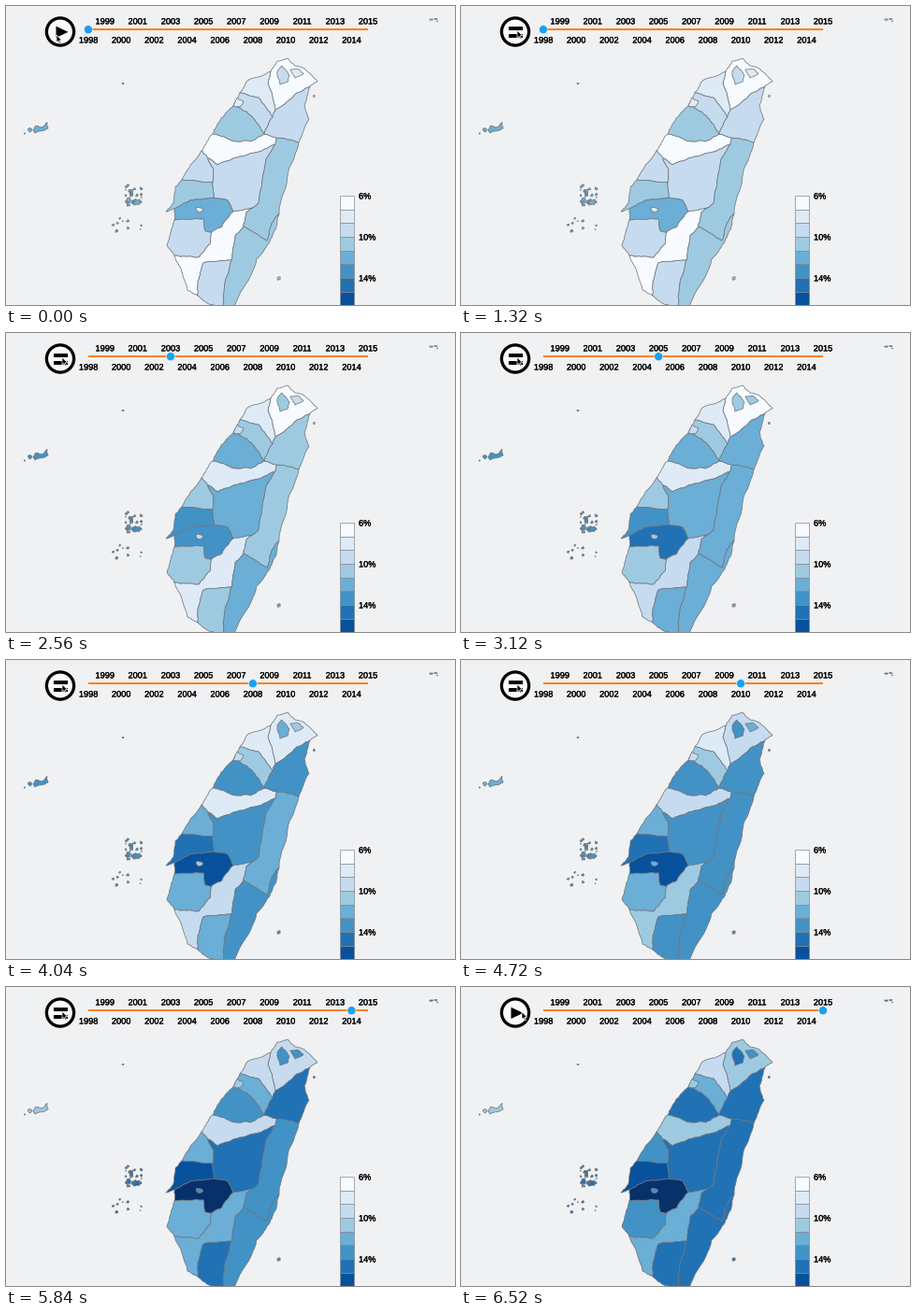
Write a matplotlib script that moves like this. It is 480 by 320 pixels and loops after 6560 ms.

```python
import numpy as np
import matplotlib.pyplot as plt
from matplotlib.animation import FuncAnimation
from matplotlib.patches import Circle, Polygon, Rectangle
from matplotlib.patheffects import withStroke

W, H, DPI = 480, 320, 100
STEP, LOOP = 40, 6560
PX = 72 / DPI
CLICK, FIRST_TICK, TICK, STOP = 1040, 1335, 292, 6270
START, END = 1998, 2015

BG, EDGE = "#f0f1f3", "#6f757b"
BLUES = ["#f7fbff", "#deebf7", "#c6dbef", "#9ecae1", "#6baed6",
         "#4292c6", "#2171b5", "#08519c", "#08306b"]

plt.rcParams["font.family"] = "Liberation Sans"
rng = np.random.default_rng(7)

fig = plt.figure(figsize=(W / DPI, H / DPI), dpi=DPI, facecolor=BG)
ax = fig.add_axes([0, 0, 1, 1])
ax.set(xlim=(0, W), ylim=(H, 0))
ax.axis("off")


def put(patch):
    return ax.add_patch(patch)


def label(x, y, s, ha="center"):
    ax.text(x, y, s, size=9.2 * PX, ha=ha, va="baseline", color="black",
            path_effects=[withStroke(linewidth=0.3 * PX, foreground="black")])


def arc(*xy):
    """Line through a few key points, roughened by midpoint displacement."""
    pts = np.array(xy, float).reshape(-1, 2)
    for _ in range(3):
        d = np.diff(pts, axis=0)
        length = np.hypot(*d.T)[:, None]
        normal = np.column_stack([-d[:, 1], d[:, 0]]) / length
        out = np.empty((2 * len(pts) - 1, 2))
        out[::2] = pts
        out[1::2] = pts[:-1] + d / 2 + normal * np.sqrt(length) * rng.uniform(
            -0.22, 0.22, length.shape)
        pts = out
    return pts


def ring(first, *rest):
    """Join arcs that share end points into one closed outline."""
    joined = any(np.allclose(first[-1], rest[0][k]) for k in (0, -1))
    path = first if joined else first[::-1]
    for a in rest:
        path = np.vstack([path, a if np.allclose(path[-1], a[0]) else a[::-1]])
    return path


def blob(x, y, rx, ry=None, n=9):
    a = np.linspace(0, 2 * np.pi, n, endpoint=False)
    r = rng.uniform(0.6, 1.2, n)
    return np.column_stack([x + rx * r * np.cos(a), y + (ry or rx) * r * np.sin(a)])


def scatter(n, x0, x1, y0, y1, size):
    return [blob(rng.uniform(x0, x1), rng.uniform(y0, y1), rng.uniform(0.4, size))
            for _ in range(n)]


# Coast, clockwise from the north-west
c_newtaipei = arc(283, 70, 290, 59, 301, 56, 309, 64, 319, 67, 333, 81, 325, 86)
c_yilan = arc(325, 86, 319, 106, 324, 121, 313, 146)
c_hualien = arc(313, 146, 302, 176, 292, 222)
c_taitung = arc(292, 222, 289, 237, 281, 254, 268, 271, 264, 283, 244, 324)
c_south = arc(244, 324, 232, 324)
c_pingtung = arc(232, 324, 217, 319, 205, 310)
c_kaohsiung = arc(205, 310, 194, 304, 180, 267)
c_tainan = arc(180, 267, 172, 256, 180, 229)
c_chiayi = arc(180, 229, 180, 217)
c_yunlin = arc(180, 217, 171, 220, 179, 211, 181, 194, 188, 186)
c_changhua = arc(188, 186, 209, 155)
c_taichung = arc(209, 155, 221, 137)
c_miaoli = arc(221, 137, 230, 120, 243, 107)
c_hsinchu = arc(243, 107, 250, 93)
c_taoyuan = arc(250, 93, 258, 80, 283, 70)

# Inland borders
newtaipei_taoyuan = arc(283, 70, 280, 83, 288, 111)
newtaipei_yilan = arc(325, 86, 311, 93, 288, 111)
taoyuan_yilan = arc(288, 111, 285, 119)
taoyuan_hsinchu = arc(250, 93, 270, 98, 285, 119)
hsinchu_yilan = arc(285, 119, 276, 137)
hsinchu_miaoli = arc(276, 137, 270, 127, 257, 113, 243, 107)
miaoli_taichung = arc(276, 137, 262, 145, 245, 145, 221, 137)
taichung_yilan = arc(276, 137, 289, 141)
yilan_hualien = arc(289, 141, 313, 146)
taichung_hualien = arc(289, 141, 288, 148)
taichung_nantou = arc(288, 148, 275, 154, 250, 161, 226, 170, 216, 163)
taichung_changhua = arc(216, 163, 209, 155)
changhua_nantou = arc(216, 163, 222, 176, 221, 189)
changhua_yunlin = arc(188, 186, 221, 189)
yunlin_nantou = arc(221, 189, 222, 205)
yunlin_chiayi = arc(180, 217, 197, 208, 222, 205)
chiayi_nantou = arc(222, 205, 237, 208, 243, 220)
nantou_hualien = arc(288, 148, 278, 164, 270, 211, 264, 216)
nantou_kaohsiung = arc(243, 220, 264, 216)
hualien_kaohsiung = arc(264, 216, 257, 221, 254, 236)
hualien_taitung = arc(254, 236, 279, 251, 284, 232, 292, 222)
kaohsiung_taitung = arc(254, 236, 245, 246, 241, 272)
chiayi_tainan = arc(180, 229, 211, 228, 213, 241, 220, 242)
chiayi_kaohsiung = arc(220, 242, 231, 236, 243, 220)
tainan_kaohsiung = arc(220, 242, 218, 255, 206, 269, 180, 267)
kaohsiung_pingtung = arc(241, 272, 211, 275, 205, 295, 205, 310)
pingtung_taitung = arc(241, 272, 234, 297, 232, 324)

counties = []


def county(start, end, *outlines, bump=0):
    """Add a county whose colour band moves from start to end."""
    group = [put(Polygon(o, ec=EDGE, lw=0.75 * PX, joinstyle="round"))
             for o in outlines]
    counties.append((group, start, end, bump))


county(-0.8, 3.05, ring(c_newtaipei, newtaipei_yilan, newtaipei_taoyuan))
county(1, 2.1, ring(c_taoyuan, newtaipei_taoyuan, taoyuan_yilan, taoyuan_hsinchu))
county(2.7, 4.1, ring(c_hsinchu, taoyuan_hsinchu, hsinchu_yilan, hsinchu_miaoli))
county(3.5, 6.1, ring(c_miaoli, hsinchu_miaoli, miaoli_taichung))
county(0.2, 3.05, ring(c_taichung, miaoli_taichung, taichung_yilan, taichung_hualien,
                       taichung_nantou, taichung_changhua))
county(2.5, 5.1, ring(c_changhua, taichung_changhua, changhua_nantou, changhua_yunlin))
county(2.95, 6.3, ring(taichung_nantou, changhua_nantou, yunlin_nantou, chiayi_nantou,
                       nantou_kaohsiung, nantou_hualien))
county(3.9, 7.9, ring(c_yunlin, changhua_yunlin, yunlin_nantou, yunlin_chiayi))
county(4.8, 8.38, ring(c_chiayi, yunlin_chiayi, chiayi_nantou, chiayi_kaohsiung,
                       chiayi_tainan))
county(2.5, 5.1, ring(c_tainan, chiayi_tainan, tainan_kaohsiung))
county(0.4, 4.4, ring(c_kaohsiung, tainan_kaohsiung, chiayi_kaohsiung,
                      nantou_kaohsiung, hualien_kaohsiung, kaohsiung_taitung,
                      kaohsiung_pingtung))
county(2.4, 6.4, ring(c_pingtung, kaohsiung_pingtung, pingtung_taitung))
county(3.5, 6.1, ring(c_taitung, c_south, pingtung_taitung, kaohsiung_taitung,
                      hualien_taitung), blob(291.5, 291.5, 2))
county(3, 6, ring(c_hualien, hualien_taitung, hualien_kaohsiung, nantou_hualien,
                  taichung_hualien, yilan_hualien))
county(2.75, 6.4, ring(c_yilan, yilan_hualien, taichung_yilan, hsinchu_yilan,
                       taoyuan_yilan, newtaipei_yilan),
       blob(329.5, 96.5, 1.2), blob(454.5, 14.5, 1.8, 0.8),
       blob(459.5, 14, 1.6, 0.8), blob(461, 16.5, 0.5))

# Cities: Taipei, Keelung, Hsinchu, Chiayi
county(2.1, 6.1, arc(295, 64, 303, 74, 301, 81, 293, 84, 290, 70, 295, 64))
county(1.4, 5.4, arc(304, 68, 312, 67, 318, 72, 309, 77, 304, 68))
county(1.7, 3.1, arc(243, 107, 247, 98, 254, 102, 250, 108, 243, 107))
county(1.4, 5.4, blob(206.5, 218, 4.8, 3))

# Kinmen and Penghu
county(4.2, 3.5, arc(29, 133, 32, 128, 38, 130, 44, 124.5, 45, 131, 31, 136, 29, 133),
       blob(25.5, 132.5, 2.2), blob(20, 136.5, 0.7), blob(125, 83, 1.2, 0.7), bump=1.4)
county(4.7, 6.1, blob(139, 210, 5.5, 3.5, 15), blob(131, 208, 3, 3, 13),
       blob(134, 200, 2.8, 4.5, 13), *scatter(22, 127, 145, 191, 214, 1.5),
       *scatter(8, 113, 131, 225, 243, 1.4), *scatter(2, 141, 145, 234, 241, 1.1))

# Legend
for i, c in enumerate(BLUES):
    put(Rectangle((357, 203 + 14.67 * i), 14.5, 14.67, fc=c, ec="#858a90",
                  lw=0.7 * PX))
for i in range(3):
    label(377, 206.5 + 44 * i, f"{6 + 4 * i}%", "left")


# Time slider
def year_x(year):
    return 88 + (year - START) * 17.59


put(Rectangle((88, 23.6), 299, 2.8, fc="#ff7f0e", lw=0))
for year in range(START, END + 1):
    label(year_x(year), 19.4 if year % 2 else 39.5, str(year))
handle = put(Circle((88, 25.2), 4.6, fc="#1ba1f0", ec=BG, lw=0.7 * PX))

# Play / pause button and pointer
put(Circle((58, 27.5), 14.6, fc="#fafafb", ec="black", lw=3.3 * PX))
play = put(Polygon([(53.5, 21.7), (53.5, 34), (66.5, 27.8)], fc="black", lw=0))
bars = [put(Rectangle((50.5, y), 15, 3.8, fc="black", lw=0)) for y in (21.8, 29.8)]
ARROW = np.array([(0, 0), (0, 8), (1.9, 6.4), (3.2, 9.2), (4.5, 8.6),
                  (3.3, 5.9), (5.7, 5.7)])
pointer = put(Polygon(ARROW, fc="black", ec="white", lw=0.7 * PX, zorder=5))


def ease(t, a, b):
    u = np.clip((t - a) / (b - a), 0, 1)
    return u * u * (3 - 2 * u)


def draw(i):
    t = i * STEP
    ticks = 0 if t < FIRST_TICK else int((t - FIRST_TICK) // TICK) + 1
    year = min(START + ticks, END)
    handle.center = (year_x(year), 25.2)

    p = ((year - START) / (END - START)) ** 0.9
    for group, start, end, bump in counties:
        level = start + (end - start) * p + bump * 4 * p * (1 - p)
        color = BLUES[max(0, int(level))]
        for shape in group:
            shape.set_facecolor(color)

    playing = CLICK <= t < STOP
    play.set_visible(not playing)
    for b in bars:
        b.set_visible(playing)
    enter, leave = ease(t, 200, 900), ease(t, 6000, 6480)
    pointer.set_xy(ARROW + (54 + 6 * enter + 5 * leave, 31 - 5 * enter + 0.5 * leave))
    return []


anim = FuncAnimation(fig, draw, frames=LOOP // STEP, interval=STEP, repeat=True,
                     init_func=lambda: draw(0), blit=False)
plt.show()
```
